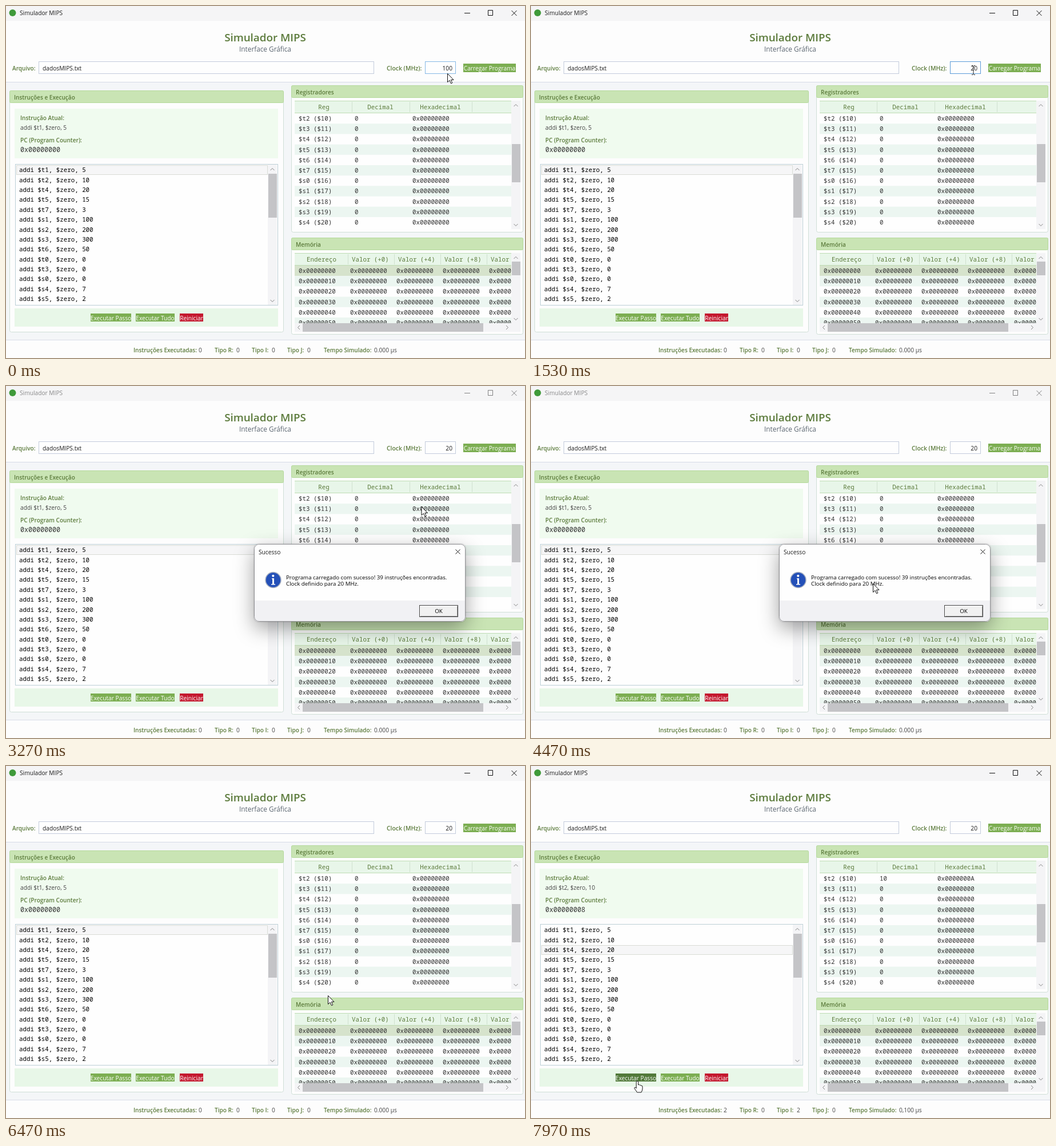
Write an HTML page that moves like this. It is 908 by 617 pixels and loops after 8000 ms.

```html
<!DOCTYPE html>
<html lang="pt">
<head>
<meta charset="utf-8">
<title>Simulador MIPS</title>
<style>
  html, body { margin: 0; width: 100%; height: 100%; overflow: hidden; background: #f4f6f8; }
  svg { display: block; width: 908px; height: 617px; }
  text { font: 10.2px "Open Sans", "Noto Sans", sans-serif; fill: #1c1c1c; white-space: pre; }
  .bold { font-weight: 600; font-size: 10.05px; fill: #5c7b3c; }
  .value { fill: #444; }
  .mono { font: 10.8px "Noto Sans Mono", "DejaVu Sans Mono", monospace; fill: #000; }
  .cell { fill: #333; }
  .head { fill: #5c7b3c; }
  .light { fill: #fff; }
  .message { font-size: 9.75px; font-weight: 500; fill: #000; }
  .middle { text-anchor: middle; }
  .end { text-anchor: end; }
  .line { fill: none; stroke-width: 1; }
  #dialog { filter: drop-shadow(0 0 1px rgba(0, 0, 0, .3)) drop-shadow(0 12px 17px rgba(0, 0, 0, .36)); }
</style>
</head>
<body>
<svg id="stage" viewBox="0 0 908 617"></svg>
<script>
const DURATION = 8000;
const ROW = 17.36;
const GREEN = { color: '#7cae52', hover: '#52793a' };
const RED = { color: '#c4182f', hover: '#8e1522' };
const BUTTONS = [
  { id: 'load', x: 800, y: 101, w: 92, h: 15, label: 'Carregar Programa', ...GREEN },
  { id: 'step', x: 148, y: 539, w: 71, h: 14, label: 'Executar Passo', ...GREEN },
  { id: 'runAll', x: 227, y: 539, w: 68, h: 14, label: 'Executar Tudo', ...GREEN },
  { id: 'reset', x: 304, y: 539, w: 41, h: 14, label: 'Reiniciar', ...RED }
];
const PROGRAM = [
  't1 5', 't2 10', 't4 20', 't5 15', 't7 3', 's1 100', 's2 200', 's3 300',
  't6 50', 't0 0', 't3 0', 's0 0', 's4 7', 's5 2'
].map(line => {
  const [register, value] = line.split(' ');
  return `addi $${register}, $zero, ${value}`;
});
// Pointer stops: time, x, y
const POINTER = [
  [0, 772, 118], [120, 772, 118], [360, 774, 112], [1650, 774, 112],
  [2150, 825, 109], [2900, 825, 109], [3700, 604, 338], [4470, 598, 346],
  [4800, 737, 394], [5600, 737, 394], [6200, 572, 402], [6470, 563, 402],
  [7050, 186, 552], [8000, 186, 552]
];
const SELECT_AT = 480, TYPE_AT = [1100, 1330], BLUR_AT = 2360;
const DIALOG_OPEN = 2800, DIALOG_CLOSE = 4930, FADE = 120;
const STEP_AT = [7220, 7640];

const hex = n => '0x' + n.toString(16).toUpperCase().padStart(8, '0');
const rect = (x, y, w, h, fill, more = '') =>
  `<rect x="${x}" y="${y}" width="${w}" height="${h}" fill="${fill}" ${more}/>`;
const box = (x, y, w, h, fill, stroke, more = '') =>
  rect(x + .5, y + .5, w - 1, h - 1, fill, `stroke="${stroke}" ${more}`);
const text = (x, y, content, kind = '', more = '') =>
  `<text x="${x}" y="${y}" class="${kind}" ${more}>${content}</text>`;
const line = (d, stroke, more = '') =>
  `<path d="${d}" class="line" stroke="${stroke}" ${more}/>`;

const chevron = (x, y, angle) =>
  line('M-3.5 2L0 -1.5L3.5 2', '#858585', `transform="translate(${x} ${y}) rotate(${angle})"`);

function scrollbar(x, y, h, thumbY, thumbH) {
  return rect(x, y, 16, h, '#f4f4f6') + rect(x + 1, thumbY, 15, thumbH, '#c4c4c7') +
    chevron(x + 8, y + 8, 0) + chevron(x + 8, y + h - 7, 180);
}

function panel(x, y, w, h, title) {
  return box(x, y, w, h, '#fdfdfd', '#cfdfd6', 'rx="3"') +
    box(x, y, w, 22, '#c9e4b4', '#b4d99b', 'rx="2"') +
    text(x + 8, y + 16, title, 'bold');
}

function windowBar() {
  return rect(0, 0, 908, 26, '#f5f5f6') +
    '<circle cx="11.5" cy="12" r="6" fill="#3f9a3a"/>' +
    `<g id="windowTitle">${text(24, 16, 'Simulador MIPS')}` +
    line('M802 12.5h10M843.5 7.5h8v9h-8zM884.5 8l9 9M893.5 8l-9 9', '#111') + '</g>';
}

function header() {
  return rect(0, 26, 908, 108, '#fdfdfd') + rect(0, 133, 908, 1, '#d5d9e6') +
    text(453.5, 61.5, 'Simulador MIPS', 'bold middle', 'style="font-size:18.8px"') +
    text(453.5, 79.5, 'Interface Gráfica', 'middle', 'style="font-size:11.8px;fill:#5a6570"') +
    text(11, 113, 'Arquivo:', 'bold') + box(57, 97, 587, 22, '#fefefe', '#c3cbdc') +
    text(64, 113, 'dadosMIPS.txt') +
    text(666, 113, 'Clock (MHz):', 'bold', 'style="font-size:10.4px"') +
    box(733, 97, 54, 22, '#fefefe', '#c3cbdc', 'id="clockBox"') +
    rect(762, 101, 19, 15, '#8fbfea', 'id="selection"') +
    text(781, 113, '100', 'end', 'id="clock"');
}

function execution() {
  return panel(6, 148, 480, 424, 'Instruções e Execução') +
    rect(15, 180, 461, 87, '#f0fbef') +
    text(25, 200, 'Instrução Atual:', 'bold') +
    text(25, 217, '', 'value', 'id="current"') +
    text(25, 239, 'PC (Program Counter):', 'bold') +
    text(25, 256, '', 'mono cell', 'id="counter" style="font-size:11.7px"') +
    box(16, 277, 460, 248, '#fefefe', '#bccfd6') +
    box(18, 279, 440, 17, '#f6f6f7', '#d9dcd6', 'id="marker"') +
    PROGRAM.map((code, i) => text(23, 291.4 + i * ROW, code, 'mono')).join('') +
    scrollbar(458, 278, 246, 294, 77) +
    rect(15, 530, 461, 32, '#e8f7e8');
}

function tableHead(y, columns, right) {
  return rect(505, y, right - 505, 21, '#e8f6e9') +
    line(`M505 ${y + .5}H${right}M505 ${y + 21.5}H${right}`, '#bfdcb4') +
    columns.map(x => line(`M${x + .5} ${y + 2}v18`, '#cfe0cf')).join('');
}

function registers() {
  const names = [...'234567'].map(n => 't' + n).concat([...'01234'].map(n => 's' + n));
  const rows = names.map((name, i) => {
    const y = 201 + i * 18.2;
    return (i % 2 ? rect(505, y - 13, 379, 18.2, '#ecf6f1') : '') +
      text(512, y, `$${name} ($${10 + i})`, 'mono cell') +
      text(610, y, '0', 'mono cell', i ? '' : 'id="decimal"') +
      text(711, y, hex(0), 'mono cell', i ? '' : 'id="hexadecimal"');
  }).join('');
  return panel(499, 139, 406, 258, 'Registradores') + rect(505, 166, 395, 225, '#fefefe') + rows +
    tableHead(166, [605, 706, 815], 884) +
    text(556, 181, 'Reg', 'mono head middle') + text(655, 181, 'Decimal', 'mono head middle') +
    text(760, 181, 'Hexadecimal', 'mono head middle') +
    scrollbar(884, 166, 225, 242, 67);
}

function memory() {
  const offsets = ['0', '4', '8', 'C'];
  let rows = '';
  for (let i = 0; i < 6; i++) {
    const y = 468 + i * 18.2;
    if (i === 0) rows += rect(505, 455, 379, 18, '#d6e3cc');
    else if (i % 2) rows += rect(505, y - 13, 379, 18.2, '#ecf6f1');
    rows += text(512, y, hex(i * 16), 'mono cell') +
      offsets.map((_, c) => text(602 + c * 81, y, hex(0), 'mono cell')).join('');
  }
  const heads = offsets.map((o, c) => text(605 + c * 81, 448, `Valor (+${o})`, 'mono head')).join('');
  return panel(499, 406, 406, 170, 'Memória') + rect(505, 433, 395, 138, '#fefefe') +
    '<clipPath id="grid"><rect x="505" y="433" width="380" height="123"/></clipPath><g clip-path="url(#grid)">' +
    rows + tableHead(433, [598, 679, 760, 841], 885) +
    text(552, 448, 'Endereço', 'mono head middle') + heads + '</g>' +
    scrollbar(884, 433, 123, 448, 24) +
    rect(505, 556, 395, 15, '#f4f4f6') + rect(519, 556, 316, 15, '#c4c4c7') +
    chevron(512, 563.5, -90) + chevron(877, 563.5, 90);
}

function statusBar() {
  const items = [
    [223, 337, 'Instruções Executadas:', 'executed'], [365, 403, 'Tipo R:', 'typeR'],
    [430, 465, 'Tipo I:', 'typeI'], [492, 527, 'Tipo J:', 'typeJ'],
    [556, 644, 'Tempo Simulado:', 'elapsed']
  ];
  return rect(0, 586, 908, 31, '#fdfdfd') + rect(0, 585, 908, 1, '#d9dde8') +
    items.map(([x, valueX, label, id]) =>
      text(x, 607, label, 'bold') + text(valueX, 607, '0', 'value', `id="${id}"`)).join('');
}

function dialog() {
  return '<g id="dialog">' + rect(434, 277, 370, 136, '#fefefe', 'rx="8"') +
    '<path d="M434 376H804V405a8 8 0 0 1-8 8H442a8 8 0 0 1-8-8Z" fill="#f1f1f4"/>' +
    rect(434.5, 277.5, 369, 135, 'none', 'rx="8" stroke="#98989c"') +
    text(442, 295, 'Sucesso') + line('M786.5 286.5l8 8M794.5 286.5l-8 8', '#111') +
    '<circle cx="467.5" cy="340" r="13.5" fill="#2450b8" stroke="#a9b2c2" stroke-width="1.6"/>' +
    '<path d="M465 337h4v10h2v1.5h-7v-1.5h2v-8.5h-1z" fill="#fff"/><circle cx="467.3" cy="332.8" r="2.1" fill="#fff"/>' +
    text(490, 338.5, 'Programa carregado com sucesso! 39 instruções encontradas.', 'message') +
    text(490, 350, 'Clock definido para 20 MHz.', 'message') +
    box(723, 384, 68, 21, '#f1f1f1', '#444') +
    line('M724.5 403.5V385.5H789.5', '#fff') + line('M725 403.5H789.5V386', '#8c8c8c') +
    text(757, 398, 'OK', 'message middle') + '</g>';
}

function pointers() {
  const shape = (id, d) =>
    `<path id="${id}" d="${d}" fill="#fff" stroke="#111" stroke-width="1" stroke-linejoin="round"/>`;
  return '<g id="pointer">' +
    shape('arrow', 'M.5 .5V15.5L4 12.3L6.5 17.8L8.8 16.8L6.4 11.4H11Z') +
    shape('hand', 'M-1.8 12V1.8Q-1.6 .3 0 .3Q1.6 .3 1.7 1.8V7Q3.6 5.8 4.4 7.6Q6.2 6.7 7 8.4Q8.9 8 9 10V14Q8.7 17 7 20H-.5Q-2 17.2-4.7 13.8Q-5.8 11.6-4.2 11.2Q-3 11-1.8 13Z') +
    '<path id="beam" class="line" stroke="#222" d="M-3 -7.5H-1L0 -6.5L1 -7.5H3M0 -6.5V7.5M-3 8.5H-1L0 7.5L1 8.5H3"/></g>';
}

const stage = document.getElementById('stage');
stage.innerHTML = windowBar() + header() + execution() + registers() + memory() + statusBar() +
  BUTTONS.map(b => rect(b.x, b.y, b.w, b.h, b.color, `id="${b.id}"`) +
    text(b.x + b.w / 2, b.y + 11.5, b.label, 'light middle')).join('') +
  dialog() + pointers();

const el = id => document.getElementById(id);
const set = (id, name, value) => el(id).setAttribute(name, value);
const write = (id, value) => {
  if (el(id).textContent !== String(value)) el(id).textContent = value;
};
const show = (id, visible) => set(id, 'visibility', visible ? 'visible' : 'hidden');
const inside = ([px, py], x, y, w, h) => px >= x && px < x + w && py >= y && py < y + h;
const clamp = v => Math.max(0, Math.min(1, v));

function pointerAt(t) {
  const next = Math.max(1, POINTER.findIndex(stop => stop[0] > t));
  const [t0, x0, y0] = POINTER[next - 1], [t1, x1, y1] = POINTER[next];
  const p = (t - t0) / (t1 - t0), k = p * p * (3 - 2 * p);
  return [x0 + (x1 - x0) * k, y0 + (y1 - y0) * k];
}

function render(t) {
  const position = pointerAt(t);
  const open = t >= DIALOG_OPEN && t < DIALOG_CLOSE;
  const focused = t >= SELECT_AT && t < BLUR_AT;
  const typed = TYPE_AT.filter(at => t >= at).length;
  const steps = STEP_AT.filter(at => t >= at).length;

  set('windowTitle', 'opacity', open ? .5 : 1);
  set('dialog', 'opacity', clamp((t - DIALOG_OPEN) / FADE) * clamp((DIALOG_CLOSE + FADE - t) / FADE));
  show('dialog', t >= DIALOG_OPEN && t < DIALOG_CLOSE + FADE);

  const overClock = !open && inside(position, 733, 97, 54, 22);
  set('clockBox', 'stroke', focused ? '#5b9bd8' : overClock ? '#86b8e6' : '#c3cbdc');
  show('selection', focused && !typed);
  write('clock', ['100', '2', '20'][typed]);

  let overButton = false;
  for (const b of BUTTONS) {
    const over = !open && inside(position, b.x, b.y, b.w, b.h);
    overButton ||= over;
    set(b.id, 'fill', over ? b.hover : b.color);
  }
  const overField = !open && (inside(position, 733, 98, 54, 19) || inside(position, 57, 98, 587, 19));
  show('hand', overButton);
  show('beam', overField);
  show('arrow', !overButton && !overField);
  set('pointer', 'transform', `translate(${position[0].toFixed(1)} ${position[1].toFixed(1)})`);

  const result = steps > 1 ? 10 : 0;
  write('current', PROGRAM[Math.max(0, steps - 1)]);
  write('counter', hex(steps * 4));
  set('marker', 'y', Math.round(279 + steps * ROW) + .5);
  write('decimal', result);
  write('hexadecimal', hex(result));
  write('executed', steps);
  write('typeI', steps);
  write('elapsed', ['0.000', '0,050', '0,100'][steps] + ' µs');
}

const start = performance.now();
function frame() {
  render((performance.now() - start) % DURATION);
  requestAnimationFrame(frame);
}
frame();
</script>
</body>
</html>
```
